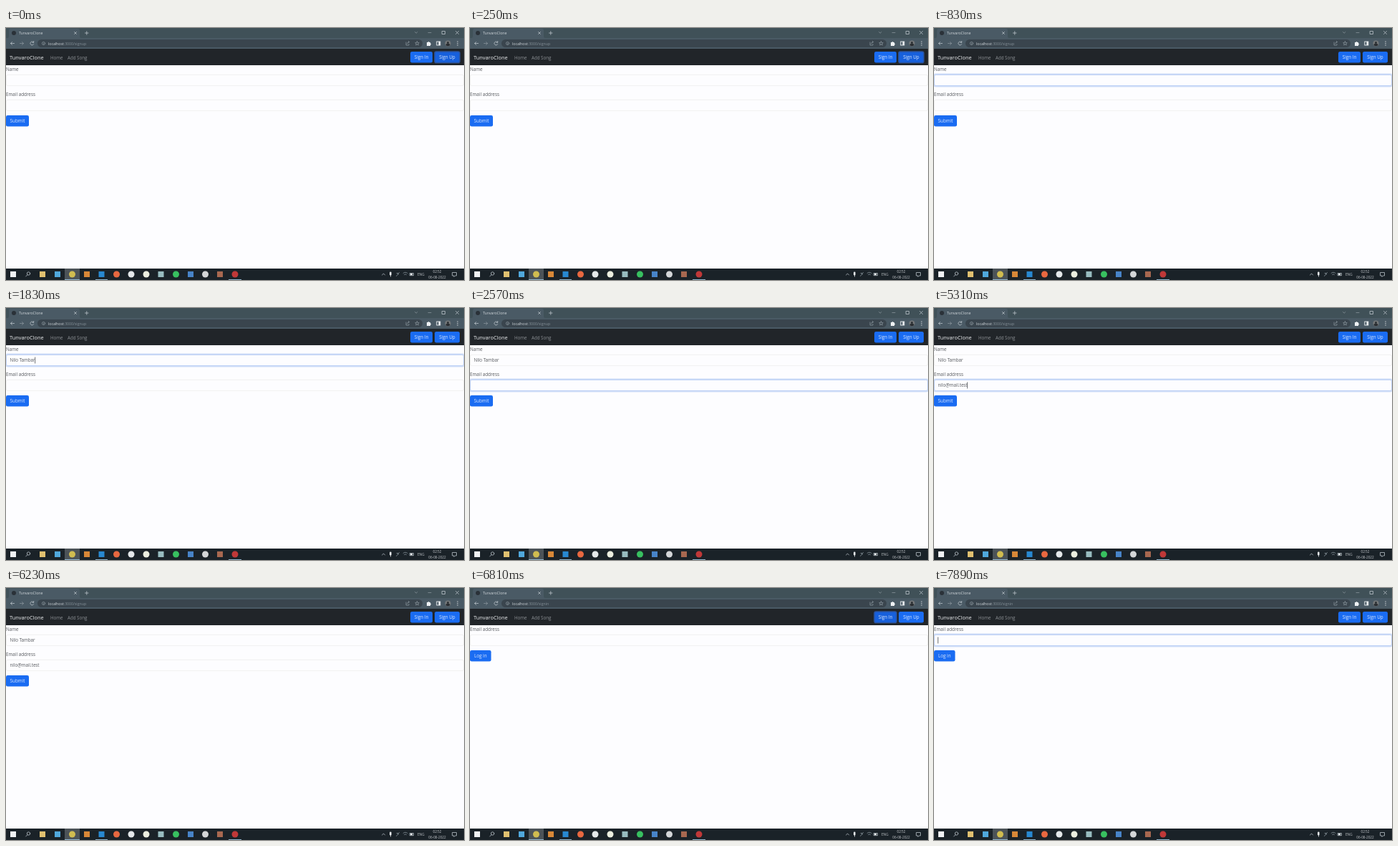
An HTML page that plays this animation: 640 by 352 pixels, repeating every 8 s.

```html
<!DOCTYPE html>
<html lang="en">
<head>
<meta charset="utf-8">
<title>Sign up form</title>
<style>
html, body { margin: 0; width: 100%; height: 100%; overflow: hidden; background: #fdfdff; }
svg { display: block; width: 100vw; height: 100vh; }
text { font-family: "Open Sans", "Noto Sans", sans-serif; white-space: pre; }
.chrome { font-size: 5.2px; fill: #d4dade; }
.nav { font-size: 6.2px; fill: #8c9094; }
.label { font-size: 6.3px; fill: #55585c; }
.value { font-size: 6.2px; fill: #55585c; }
.btn rect { fill: #1a6cf2; }
.btn text { font-size: 6.3px; fill: #dfeafc; text-anchor: middle; }
.btn.focus rect { fill: #1760dc; stroke: #2a54a0; stroke-width: 1.6; }
.field .box { fill: #fdfdff; stroke: #eeeeec; stroke-width: .8; }
.field .ring { fill: none; stroke: none; }
.field.focus .box { stroke: #a9c2f0; }
.field.focus .ring { stroke: #d0def8; stroke-width: 1.4; }
.caret { fill: #606468; }
.line { fill: none; stroke: #b9c2c8; stroke-width: .8; stroke-linecap: round; stroke-linejoin: round; }
.dim { stroke: #87929a; }
.tray { font-size: 4.7px; fill: #c4c8cc; }
</style>
</head>
<body>
<svg id="stage" viewBox="0 0 640 352" preserveAspectRatio="none">
  <rect width="640" height="352" fill="#fdfdff"/>

  <!-- tab strip -->
  <rect width="640" height="14" fill="#405158"/>
  <path d="M2 14Q4 14 4 11V3Q4 1 6 1H101Q103 1 103 3V11Q103 14 105 14Z" fill="#4a5a65"/>
  <circle cx="11" cy="7" r="3" fill="#2a3138"/>
  <text class="chrome" x="18" y="9">TunvaroClone</text>
  <path class="line" d="M95.5 5.5l3 3m0-3l-3 3M110.5 7h4.5m-2.25-2.25v4.5"/>
  <path class="line dim" d="M571.5 5.5l1.7 1.7 1.7-1.7M590 6.5h4"/>
  <path class="line" d="M609.5 4.5h4v4h-4zM628.5 4.5l4 4m0-4l-4 4"/>

  <!-- toolbar -->
  <rect y="14" width="640" height="15" fill="#4a5a65"/>
  <rect x="44" y="16" width="538" height="11" rx="5.5" fill="#3a454e"/>
  <path class="line" d="M11.5 21.5h-5m2-2l-2 2 2 2"/>
  <path class="line dim" d="M19.5 21.5h5m-2-2l2 2-2 2"/>
  <path class="line" d="M38.5 20a2.5 2.5 0 1 0 .2 2.6M38.7 18.5v1.8h-1.8"/>
  <g class="line dim">
    <circle cx="52.5" cy="21.5" r="2.1"/><path d="M52.5 21.2v1.2"/>
    <path d="M559 20v4h4v-1.500M560.5 22q.3-2.500 3-2.500m-1.200-1.200l1.200 1.200-1.200 1.200"/>
    <path d="M574.500 18.700l.8 1.900 2 .1-1.600 1.300.6 2-1.800-1.100-1.800 1.100.6-2-1.600-1.300 2-.1z"/>
  </g>
  <path d="M588 20h1.500a1 1 0 0 1 2 0h1.500v1.500a1 1 0 0 1 0 2V25h-5z" fill="#eef1f4"/>
  <rect x="601.800" y="19" width="5" height="5" fill="none" stroke="#eef1f4" stroke-width=".9"/>
  <rect x="604.500" y="19" width="2.300" height="5" fill="#eef1f4"/>
  <circle cx="617.500" cy="21.500" r="4" fill="#74787a"/>
  <circle cx="617.500" cy="20.500" r="1.400" fill="#2a2e32"/>
  <path d="M614.500 24a3 2.500 0 0 1 6 0q-3 2.500-6 0z" fill="#2a2e32"/>
  <g fill="#ccd2d6"><circle cx="631" cy="19" r=".7"/><circle cx="631" cy="21.500" r=".7"/><circle cx="631" cy="24" r=".7"/></g>
  <text class="chrome" x="59" y="23.500" font-size="5.500">localhost<tspan id="path" fill="#87929a"></tspan></text>

  <!-- navbar -->
  <rect y="29" width="640" height="23" fill="#212529"/>
  <text x="5" y="44" font-size="7.400" fill="#f0f2f4">TunvaroClone</text>
  <text class="nav" x="62" y="43.500">Home</text>
  <text class="nav" x="86" y="43.500">Add Song</text>

  <g id="page"></g>

  <!-- taskbar -->
  <rect y="336" width="640" height="16" fill="#1a2228"/>
  <rect x="82" y="336" width="21" height="16" fill="#4c5358"/>
  <g id="icons"></g>
  <g fill="#8fb4cc"><rect x="82" y="351" width="21" height="1"/><rect x="125" y="351" width="17" height="1"/><rect x="311" y="351" width="18" height="1"/></g>
  <g class="line">
    <circle cx="31.500" cy="343" r="2.200"/><path d="M30 344.700l-2.300 2.300"/>
    <path d="M525.500 345l2-2 2 2"/><path d="M624 341.500h5.500v4.500h-2l-1.500 1.500v-1.500h-2z"/>
    <path class="dim" d="M545.500 346.500l4-5M546 342.500h2v2M555 342.500a4 4 0 0 1 6 0M556.500 344.500a2 2 0 0 1 3 0"/>
    <rect x="564.500" y="342.500" width="5" height="3.200"/>
  </g>
  <g fill="#e4e8ea"><rect x="536" y="340.500" width="2.600" height="5" rx="1.300"/><rect x="537" y="345" width=".8" height="2.500"/><rect x="565" y="343" width="3" height="2.200"/></g>
  <text class="tray" x="575" y="346">ENG</text>
  <text class="tray" x="602.500" y="342" text-anchor="middle">02:52</text>
  <text class="tray" x="602.500" y="350" text-anchor="middle">06-08-2022</text>
</svg>
<script>
const LOOP = 8000, BLINK = 530;
const SIGN_IN_AT = 6300;
const $ = id => document.getElementById(id);

function add(parent, tag, attrs = {}, text = "") {
  const node = document.createElementNS("http://www.w3.org/2000/svg", tag);
  for (const key in attrs) node.setAttribute(key, attrs[key]);
  node.textContent = text;
  return parent.appendChild(node);
}

function button(parent, x, y, width, text) {
  const g = add(parent, "g", { class: "btn" });
  add(g, "rect", { x, y, width, height: 15.5, rx: 2.3 });
  add(g, "text", { x: x + width / 2, y: y + 10.2 }, text);
  return g;
}

function field(parent, y, label) {
  add(parent, "text", { class: "label", x: 0, y: y - 5 }, label);
  const g = add(parent, "g", { class: "field" });
  add(g, "rect", { class: "ring", x: -.5, y: y - .7, width: 641, height: 17.4, rx: 3 });
  add(g, "rect", { class: "box", x: .4, y: y + .4, width: 639.2, height: 15.2, rx: 2.3 });
  const value = add(g, "text", { class: "value", x: 5.5, y: y + 10.3 });
  const caret = add(g, "rect", { class: "caret", y: y + 3.5, width: .9, height: 9 });
  return { g, value, caret };
}

const page = $("page");
const signIn = button(page, 565, 33, 31, "Sign In");
const signUp = button(page, 599, 33, 35, "Sign Up");
const signUpForm = add(page, "g");
const signInForm = add(page, "g");
button(signUpForm, 0, 122, 32, "Submit");
button(signInForm, 0, 87, 29.5, "Log in");

const name = "Nilo Tambar";
const inputs = [
  { ...field(signUpForm, 65, "Name"), text: name, from: 290, to: 1990,
    keys: [...name].map((_, i) => 910 + i * 83) },
  { ...field(signUpForm, 100, "Email address"), text: "nilo@mail.test", from: 1990, to: 5800,
    keys: [3070, 3240, 3320, 3490, 3650, 4070, 4320, 4480, 4570, 4570, 4730, 4730, 4820, 5060] },
  { ...field(signInForm, 65, "Email address"), text: "", from: 7390, to: LOOP, keys: [] }
];

// x, colour, shape
const icons = [
  [10, "#f0f2f4", "square"], [51, "#e0c070", "square"], [72, "#50a8dc", "square"],
  [92.5, "#d0bc50", "circle"], [113, "#d88838", "square"], [133.5, "#2888d0", "square"],
  [154.5, "#e86840", "circle"], [175, "#e4e8ea", "circle"], [196, "#eceee0", "circle"],
  [216.5, "#98bcc0", "square"], [237.5, "#38c060", "circle"], [258, "#4884c8", "square"],
  [278.5, "#d4d6d8", "circle"], [299, "#a86850", "square"], [320, "#c03838", "circle"]
];
for (const [x, fill, shape] of icons) {
  if (shape === "circle") add($("icons"), "circle", { cx: x, cy: 344, r: 4.5, fill });
  else add($("icons"), "rect", { x: x - 4, y: 340, width: 8, height: 8, fill });
}

const show = (node, on) => node.setAttribute("visibility", on ? "inherit" : "hidden");

function drawInput(input, t) {
  const focused = t >= input.from && t < input.to;
  const typed = input.keys.filter(k => k <= t).length;
  const since = t - (typed ? input.keys[typed - 1] : input.from);
  input.g.classList.toggle("focus", focused);
  input.value.textContent = input.text.slice(0, typed);
  const width = typed ? input.value.getComputedTextLength() : 0;
  input.caret.setAttribute("x", 5.2 + width);
  show(input.caret, focused && Math.floor(since / BLINK) % 2 === 0);
}

function draw(t) {
  const onSignIn = t >= SIGN_IN_AT;
  show(signUpForm, !onSignIn);
  show(signInForm, onSignIn);
  $("path").textContent = ":3000/" + (onSignIn ? "signin" : "signup");
  signUp.classList.toggle("focus", t < inputs[0].from);
  signIn.classList.toggle("focus", onSignIn && t < inputs[2].from);
  inputs.forEach(input => drawInput(input, t));
}

const start = performance.now();
function tick() {
  draw((performance.now() - start) % LOOP);
  requestAnimationFrame(tick);
}
tick();
</script>
</body>
</html>
```
